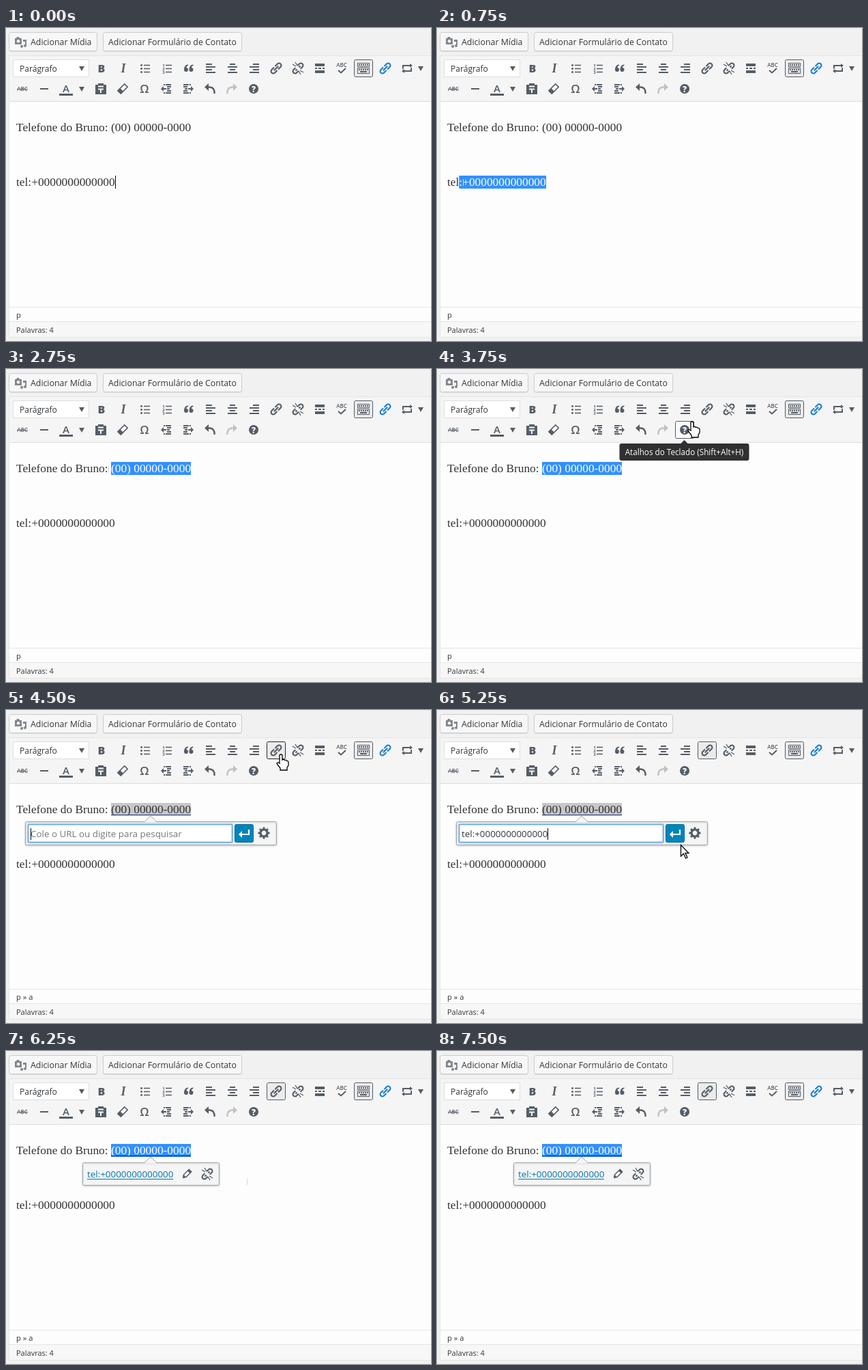
An HTML page with a canvas that plays this animation: 623 by 458 pixels, repeating every 7.75 s.

```html
<!DOCTYPE html>
<html lang="pt-BR">
<head>
<meta charset="utf-8">
<title>Editor</title>
<style>
html, body { margin: 0; width: 100%; height: 100%; overflow: hidden; background: #f1f1f1; }
canvas { display: block; }
</style>
</head>
<body>
<canvas id="stage" width="623" height="458"></canvas>
<script>
const ctx = document.getElementById('stage').getContext('2d');
const STEP = 250, LOOP = 7750;
const INK = '#555d66', BLUE = '#3390ff', PAPER = '#fdfdfd';
const SANS = '"Open Sans", sans-serif', SERIF = '"Liberation Serif", serif';
const BODY_FONT = '17.35px ' + SERIF, INPUT_FONT = '13.4px ' + SANS;
const PHONE = '(00) 00000-0000', TEL = 'tel:+0000000000000';

function rect(x, y, w, h, color) {
  ctx.fillStyle = color;
  ctx.fillRect(x, y, w, h);
}

function box(x, y, w, h, fill, border, radius = 0) {
  ctx.beginPath();
  ctx.roundRect(x + .5, y + .5, w - 1, h - 1, radius);
  ctx.fillStyle = fill;
  ctx.fill();
  ctx.lineWidth = 1;
  ctx.strokeStyle = border;
  ctx.stroke();
}

function text(str, x, y, font, color = '#32373c', align = 'left') {
  ctx.font = font;
  ctx.fillStyle = color;
  ctx.textAlign = align;
  ctx.fillText(str, x, y);
}

const sans = (str, x, y, size, color, align, weight = 400) =>
  text(str, x, y, `${weight} ${size}px ${SANS}`, color, align);

// A width of 0 fills the path, any other width strokes it.
function icon(x, y, d, width = 2, color = INK, { angle = 0, flip = 1 } = {}) {
  const path = new Path2D(d);
  ctx.save();
  ctx.translate(x, y);
  ctx.rotate(angle * Math.PI / 180);
  ctx.scale(flip, 1);
  ctx.fillStyle = ctx.strokeStyle = color;
  ctx.lineWidth = width;
  if (width) ctx.stroke(path); else ctx.fill(path);
  ctx.restore();
}

function link(x, y, color) {
  icon(x, y, 'M-1-3.2H-6A3.2 3.2 0 0 0-6 3.2H-1M1-3.2H6A3.2 3.2 0 0 1 6 3.2H1M-4.5 0H4.5', 2.15, color, { angle: -45 });
}

function unlink(x, y) {
  icon(x, y, 'M-2-3.2H-6A3.2 3.2 0 0 0-6 3.2H-2M2-3.2H6A3.2 3.2 0 0 1 6 3.2H2M-5 0H-2M2 0H5', 2.1, INK, { angle: -45 });
  icon(x, y, 'M-8-6L-3-3M-4-9L-1-4M8 6L3 3M4 9L1 4', 1.3);
}

function triangle(x, y) {
  icon(x, y, 'M-4-3H4L0 4Z', 0);
}

function indent(x, y, flip) {
  icon(x, y, 'M-4-6h2m1 0H7M1-3H7M1 0H5M1 3H7M-4 6h2m1 0H7', 1.8, INK, { flip });
  icon(x, y, 'M-8 0L-4-4V-1H0V1H-4V4Z', 0, INK, { flip });
}

function undo(x, y, color, flip) {
  icon(x, y, 'M-8-2.5L-2-8V3Z', 0, color, { flip });
  icon(x, y, 'M-3-2.5H0Q7-2 6.5 7', 2.4, color, { flip });
}

function keyboard(x, y) {
  icon(x, y, 'M-8.5-7.5H8.5V-2.5H-8.5ZM-8.5-.5H8.5V7.5H-8.5Z', 1);
  const keys = 'h2m1 0h2m1 0h2m1 0h2m1 0h2';
  icon(x, y, `M-7-5${keys}M-7 2${keys}M-5 5H5`);
}

function topButtons() {
  for (const [x, w] of [[4, 130], [142, 204]]) {
    box(x, 7, w, 28, '#ddd', '#ddd', 3);
    box(x, 6, w, 28, '#f7f7f7', '#ccc', 3);
  }
  const grey = '#82878c';
  icon(20, 20, 'M-7-5H-5L-4-7H-1L0-5H3V4H-7Z', 0, grey);
  icon(20, 20, 'M-2-3A2.3 2.3 0 1 0-1.9-3Z', 0, '#f7f7f7');
  icon(20, 20, 'M5-3H10V6A2 2 0 1 1 8 4V0H5V7A2 2 0 1 1 3 5H5Z', 0, grey);
  sans('Adicionar Mídia', 36, 25, 12.35);
  sans('Adicionar Formulário de Contato', 150, 25, 12.35);
}

function firstRow(linkOn, linkHover) {
  const y = 59;
  box(10, 46, 112, 26, '#fff', '#ddd');
  sans('Parágrafo', 20, 64, 12.1);
  triangle(111, y);
  sans('B', 140, 65, 16, INK, 'center', 800);
  text('I', 172, 65, 'italic 700 18px ' + SERIF, INK, 'center');
  for (const x of [204, 236]) icon(x, y, 'M-2-4.5H7M-2 .5H7M-2 5.5H7', 1.4);
  for (const dy of [-4.5, .5, 5.5]) icon(198.5, y + dy, 'M0-1.5A1.5 1.5 0 1 0 .1-1.5Z', 0);
  [1, 2, 3].forEach((n, i) => sans(n, 231, 56.5 + i * 5, 6, INK, 'center', 700));
  for (const x of [268, 275.5])
    icon(x, y, 'M-7 2C-7-2-5-5.5-1-5.5V-4C-3-3.4-3.5-2.4-3.6-1A3 3 0 1 1-7 2Z', 0);
  icon(300, y, 'M-7-6H2M-7-2H7M-7 2H2M-7 6H7');
  icon(332, y, 'M-4-6H4M-7-2H7M-4 2H4M-7 6H7');
  icon(364, y, 'M-2-6H7M-7-2H7M-2 2H7M-7 6H7');
  if (linkOn || linkHover) box(382, 46, 28, 26, linkOn ? '#ebebeb' : '#fafafa', linkHover ? '#23282d' : INK, 2);
  link(396, y);
  unlink(428, y);
  icon(460, y, 'M-7-5H7M-7 5H7', 4);
  icon(460, y, 'M-7 0h3M-2 0h4M4 0h3');
  sans('ABC', 492, 57, 8, INK, 'center', 600);
  icon(492, y, 'M-5 3L-1 6.5L6 0');
  box(510, 46, 28, 26, '#ebebeb', INK, 2);
  keyboard(524, y);
  link(556, y, '#1e80cc');
  icon(588, y, 'M-5-3V0L-7 1.5V-5H4V-7L8-4L4-1V-3ZM5 3V0L7-1.5V5H-4V7L-8 4L-4 1V3Z', 0);
  triangle(608, y);
}

function secondRow(helpHover) {
  const y = 89;
  sans('ABC', 24, 92, 8, INK, 'center', 600);
  icon(24, y, 'M-8 .5H8', 1);
  icon(56, y, 'M-6 0H6');
  sans('A', 88, 94, 15, INK, 'center', 600);
  icon(88, y, 'M-10 8.5H10', 3);
  triangle(111, y);
  icon(139, y, 'M-8-6H-4V-8H4V-6H8V8H-8Z', 0);
  icon(139, y, 'M-4-3.5H4M-4 .5H4M0 .5V6', 2, '#f5f5f5');
  icon(171, y, 'M-7-3.2H7V3.2H-7Z', 1.6, INK, { angle: -45 });
  icon(171, y, 'M-7-3H-2V3H-7Z', 0, INK, { angle: -45 });
  sans('Ω', 203, 95, 17, INK, 'center', 600);
  indent(235, y, 1);
  indent(267, y, -1);
  undo(299, y, INK, 1);
  undo(331, y, '#bfc2c5', -1);
  if (helpHover) box(349, 76, 28, 26, '#fafafa', INK, 2);
  icon(363, y, 'M0-7A7 7 0 1 0 .1-7Z', 0);
  sans('?', 363, 94, 12, '#fff', 'center', 800);
}

function chrome(state) {
  rect(0, 0, 623, 458, '#f1f1f1');
  topButtons();
  rect(4, 40, 619, 413, '#e5e5e5');
  rect(5, 41, 618, 66, '#f5f5f5');
  rect(5, 107, 618, 1, '#ddd');
  rect(5, 108, 618, 300, PAPER);
  rect(5, 409, 618, 20, PAPER);
  rect(5, 430, 618, 22, '#f7f7f7');
  firstRow(state.linked, state.linkHover);
  secondRow(state.helpHover);
  sans(state.linked ? 'p » a' : 'p', 15, 424, 11.2);
  sans('Palavras: 4', 15, 446, 11);
}

// Draws a line of body text with the characters from `from` onwards selected.
function bodyText(str, x, baseline, from, back = BLUE, front = '#fff', underline) {
  text(str, x, baseline, BODY_FONT, '#333');
  const end = x + Math.round(ctx.measureText(str).width);
  const start = x + ctx.measureText(str.slice(0, from)).width;
  if (from < str.length) {
    ctx.save();
    ctx.beginPath();
    ctx.rect(start, baseline - 15, end - start, 19);
    ctx.clip();
    rect(x, baseline - 15, end - x, 19, back);
    text(str, x, baseline, BODY_FONT, front);
    ctx.restore();
  }
  if (underline) rect(x, baseline + 2, end - x, 1, underline);
  return end;
}

function popup(x, w, h) {
  ctx.save();
  ctx.shadowColor = 'rgba(0,0,0,.18)';
  ctx.shadowBlur = 3;
  ctx.shadowOffsetY = 1;
  box(x, 163, w, h, '#f5f5f5', '#a0a5aa', 2);
  ctx.restore();
  icon(212, 164, 'M-9 0L0-9L9 0Z', 0, '#f5f5f5');
  icon(212, 164, 'M-9-.5L0-9L9-.5', 1, '#a0a5aa');
}

function urlForm(value) {
  popup(28, 369, 35);
  ctx.save();
  ctx.shadowColor = '#5b9dd9';
  ctx.shadowBlur = 3;
  box(32, 167, 300, 27, '#fff', '#5b9dd9');
  ctx.restore();
  text(value || 'Cole o URL ou digite para pesquisar', 36, 186, INPUT_FONT, value ? '#32373c' : '#777');
  rect(value ? 36 + Math.round(ctx.measureText(value).width) : 36, 173, 1, 17, '#000');
  box(335, 167, 28, 27, '#0085ba', '#006799', 2);
  icon(349, 180, 'M7-5V2H-4', 2.2, '#fff');
  icon(349, 180, 'M-8 2L-3-3V7Z', 0, '#fff');
  icon(378, 180, 'M0-5A5 5 0 1 0 .1-5', 3.2);
  icon(378, 180, 'M0-8.5V-5M0 5V8.5M-8.5 0H-5M5 0H8.5M-6-6L-4-4M6-6L4-4M-6 6L-4 4M6 6L4 4', 3);
}

function linkPreview() {
  popup(112, 201, 34);
  text(TEL, 119, 185, INPUT_FONT, '#0073aa');
  rect(119, 187, Math.round(ctx.measureText(TEL).width), 1, '#0073aa');
  icon(265, 180, 'M-7-2.5H4L7.5 0L4 2.5H-7Z', 1.5, INK, { angle: 135 });
  icon(265, 180, 'M4-2.5L8 0L4 2.5ZM-7-2.5H-4V2.5H-7Z', 0, INK, { angle: 135 });
  unlink(295, 180);
}

function tooltip(str, x, y) {
  ctx.font = '11.7px ' + SANS;
  const w = Math.round(ctx.measureText(str).width) + 16;
  ctx.beginPath();
  ctx.roundRect(x - w / 2, y + 5, w, 25, 3);
  ctx.fillStyle = '#303030';
  ctx.fill();
  icon(x, y, 'M-6 6L0 0L6 6Z', 0, '#303030');
  text(str, x, y + 22, ctx.font, '#fff', 'center');
}

const CURSORS = {
  beam: ['M0-5V5', '#d4d4d4'],
  arrow: ['M.5 .5V17L4.5 13.2L7.5 20L10 19L7 12.3H12Z', '#000'],
  hand: ['M-2 1Q0-1 2 1V8Q4 6.5 5.5 8.5Q7.5 7.5 8.5 9.5Q11 9 11 12V16L9 19.5V23H-1V20L-6 13.5Q-6 10.5-2 13Z', '#000']
};

function drawCursor([kind, x, y]) {
  const [path, color] = CURSORS[kind];
  if (kind !== 'beam') icon(x, y, path, 0, '#fff');
  icon(x + (kind === 'beam' ? .5 : 0), y, path, kind === 'beam' ? 1 : 1.3, color);
}

// Each entry holds from its step until the next one.
const POINTER = [
  [1, 'beam', 125, 226], [2, 'beam', 82, 226], [3, 'beam', 38, 226], [4, 'beam', 10, 226],
  [6, 'beam', 75, 205], [7, 'beam', 190, 176], [8, 'beam', 281, 155], [9, 'beam', 274, 147],
  [10, 'beam', 214, 147], [11, 'beam', 150, 147], [12, 'beam', 196, 138], [13, 'beam', 275, 122],
  [14, 'arrow', 335, 95], [15, 'hand', 374, 77], [16, 'hand', 403, 65],
  [20, 'beam', 399, 134], [21, 'arrow', 357, 197], [22, 'hand', 350, 180], [24, 'beam', 353, 205],
  [25, 'beam', 353, 191], [26, 'beam', 345, 270], [27, 'beam', 335, 355], [28]
];
const TEL_DRAG = [18, 13, 9, 3, 0], PHONE_DRAG = [15, 8, 0];

function draw(step) {
  const linked = step >= 18, applied = step >= 23;
  chrome({
    linked,
    helpHover: step === 15,
    linkHover: step >= 16 && step < 20
  });

  text('Telefone do Bruno:', 15, 151, BODY_FONT, '#333');
  const phoneFrom = step < 9 ? PHONE.length : PHONE_DRAG[Math.min(step - 9, 2)];
  const grey = linked && !applied;
  const phoneEnd = bodyText(PHONE, 154, 151, phoneFrom, grey ? '#c8c8c8' : BLUE, grey ? '#333' : '#fff',
    linked && (grey ? '#35408c' : '#0b2a9c'));
  const telFrom = step < 9 ? TEL_DRAG[Math.min(step, 4)] : TEL.length;
  const telEnd = bodyText(TEL, 15, 231, telFrom);
  if (step === 0) rect(telEnd, 216, 1, 19, '#000');
  if (step === 9) rect(phoneEnd, 136, 1, 19, '#000');

  if (applied) linkPreview();
  else if (linked) urlForm(step >= 19 ? TEL : '');

  if (step === 15) tooltip('Atalhos do Teclado (Shift+Alt+H)', 362.5, 104);
  if (step === 16 || step === 17) tooltip('Inserir/editar link (Ctrl+K)', 396, 74);

  const pointer = POINTER.findLast(entry => entry[0] <= step);
  if (pointer && pointer[1]) drawCursor(pointer.slice(1));
}

function tick() {
  draw(Math.floor(performance.now() % LOOP / STEP));
  requestAnimationFrame(tick);
}
tick();
</script>
</body>
</html>
```
